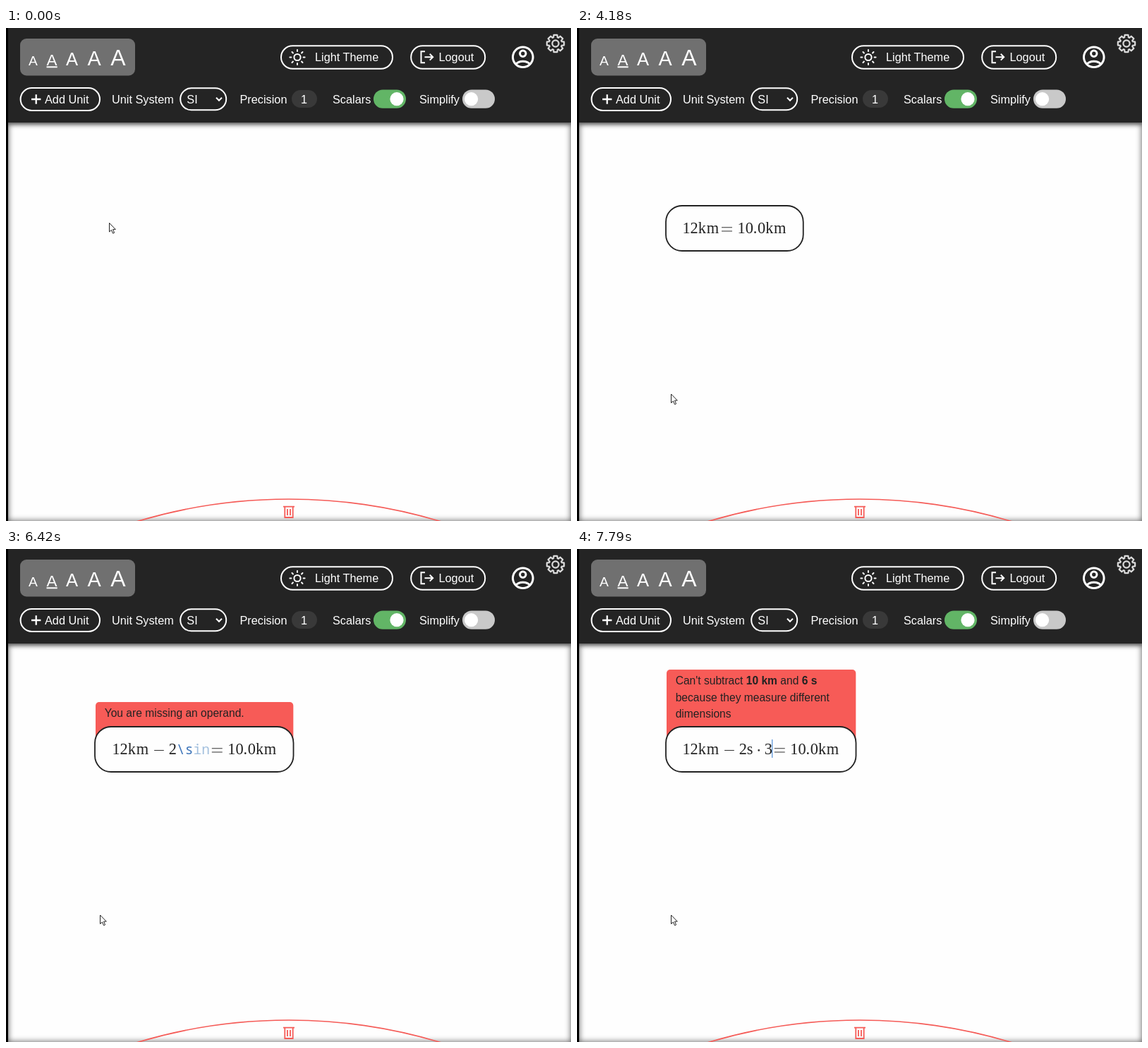
These frames come from a looping animation (801 by 699 pixels, 8 s). An HTML page:

```html
<!DOCTYPE html>
<html lang="en">
<head>
<meta charset="utf-8">
<title>Unit calculator</title>
<style>
  html, body { margin: 0; width: 100%; height: 100%; overflow: hidden; background: #000; }
  .board, .bar, svg { position: absolute; }
  .board { left: 3px; top: 134px; width: 798px; height: 565px; background: #fefefe; box-shadow: inset 0 0 8px #555; }
  .bar { left: 3px; top: 0; width: 798px; height: 134px; background: #242424; box-shadow: 0 2px 7px rgba(0, 0, 0, .55); }
  svg { left: 0; top: 0; width: 801px; height: 699px; display: block; }
  text { white-space: pre; font-family: "Liberation Sans", Arial, sans-serif; }
  .ui text { fill: #fff; font-size: 16.3px; }
  .line { fill: none; stroke: #fff; stroke-width: 2; }
  .red { fill: none; stroke: #f55b57; }
  .math { font: 22.4px "Liberation Serif", "Times New Roman", serif; fill: #222; }
  .code { font: 19.6px "Noto Sans Mono", "DejaVu Sans Mono", monospace; fill: #3f76ba; }
  .hint { fill: #a3c0de; }
  .note text { font-size: 15.6px; fill: #222; }
  .bold { font-weight: bold; }
</style>
</head>
<body>
<div class="board"></div>
<div class="bar"></div>
<svg viewBox="0 0 801 699">
  <g class="ui">
    <rect x="20" y="15" width="163" height="52.5" rx="9" fill="#707070"/>
    <g id="sizes" text-anchor="middle"></g>
    <path d="M57.5 55.3H72.7" class="line" stroke-width="1.5"/>

    <rect x="390" y="25.3" width="158" height="32.4" rx="16.2" class="line"/>
    <circle cx="413" cy="41.5" r="4.6" class="line"/>
    <path id="rays" class="line" stroke-linecap="round"/>
    <text x="438" y="47">Light Theme</text>

    <rect x="574.2" y="25.3" width="105" height="32.4" rx="16.2" class="line"/>
    <path d="M594 33.2H588.5V49.3H594M593.5 41.2H605M600.8 36.8L605.2 41.2L600.8 45.6" class="line"/>
    <text x="613.5" y="47">Logout</text>

    <g class="line" stroke-width="3" style="stroke-width:3">
      <circle cx="732.8" cy="41.3" r="14.3"/>
      <circle cx="732.8" cy="36.2" r="4.2"/>
      <path d="M722.8 51.3C727 45.8 738.6 45.8 742.8 51.3"/>
    </g>
    <g class="line" style="stroke:#dcdcdc;stroke-width:2.2" stroke-linejoin="round">
      <path id="gear"/>
      <circle cx="779" cy="22" r="4.6"/>
    </g>

    <rect x="20.6" y="85" width="112.4" height="32" rx="16" class="line"/>
    <path d="M36 101H49.4M42.7 94.3V107.7" class="line" style="stroke-width:2.3"/>
    <text x="55" y="106.5">Add Unit</text>
    <text x="150" y="106.5">Unit System</text>
    <rect x="247.2" y="85.3" width="65" height="31" rx="15.5" class="line"/>
    <text x="256.3" y="106.5">SI</text>
    <path d="M298 98.8L302 102.8L306 98.8" class="line"/>
    <text x="331.5" y="106.5">Precision</text>
    <rect x="405" y="88" width="36" height="25" rx="12.5" fill="#393939"/>
    <text x="422.5" y="106.5" text-anchor="middle">1</text>
    <text x="463" y="106.5">Scalars</text>
    <rect x="521" y="87.5" width="46" height="26.3" rx="13.1" fill="#62b566"/>
    <circle cx="554" cy="100.7" r="9.6" fill="#fff"/>
    <text x="586" y="106.5">Simplify</text>
    <rect x="647" y="87.5" width="46" height="26.3" rx="13.1" fill="#c9c9c9"/>
    <circle cx="659.6" cy="100.7" r="9.6" fill="#fff"/>
  </g>

  <circle cx="401" cy="1415" r="747" class="red" stroke-width="1.6"/>
  <path d="M393 678.7H409M395.3 678.7V694H406.7V678.7M399 682V691M403 682V691" class="red" stroke-width="1.8"/>

  <g class="note" id="note">
    <rect id="panel" x="127" rx="5" fill="#f75b57"/>
    <g id="message"></g>
  </g>
  <g id="cell">
    <rect id="box" x="126" y="252" height="64" rx="23" fill="#fefefe" stroke="#222" stroke-width="1.8"/>
    <path id="signs" fill="#333"/>
    <text id="math" class="math" y="291"></text>
    <text id="code" class="code" y="291"></text>
    <text id="hint" class="code hint" y="291"></text>
    <rect id="caret" y="270" width="1.4" height="26" fill="#6a9fdc"/>
  </g>
  <path id="mouse" d="M.5 .5V13L3.4 10.4L5.6 15.2L7.6 14.3L5.5 9.6H9.3Z" fill="#fff" stroke="#222" stroke-width="1"/>
</svg>
<script>
const LOOP = 8000;
const EM = 22.4, MONO = 11.8, BASE = 291;
const ADVANCE = { '.': .278, k: .528, m: .833, s: .394, '-': .778, '=': .778, '·': .278 };
const $ = id => document.getElementById(id);
const set = (el, attrs) => { for (const k in attrs) el.setAttribute(k, attrs[k]); };

const MISSING = { top: 217, lines: ['You are missing an operand.'] };
const mismatch = amount => ({
  top: 173,
  lines: [`Can't subtract *10 km* and *${amount}*`, 'because they measure', 'different dimensions']
});
const MISMATCH_WIDE = {
  top: 171,
  lines: ["Can't subtract *10 km* and *6 s*", 'because they measure different', 'dimensions']
};

// Each step overrides the previous one.
const steps = [
  { t: 0, shown: false, expr: '', code: '', hint: '', result: '', caret: false, error: null, alpha: 1 },
  { t: 130, shown: true, caret: true },
  { t: 670, caret: false },
  { t: 1090, caret: true },
  { t: 1660, expr: '1', result: '1.0' },
  { t: 1780, expr: '12', result: '10.0' },
  { t: 2200, code: '\\', caret: false },
  { t: 2760, code: '\\k', hint: 'er' },
  { t: 2890, code: '\\km', hint: '' },
  { t: 3600, expr: '12km', code: '', result: '10.0km', caret: true },
  { t: 4180, caret: false },
  { t: 4480, expr: '12km-', caret: true },
  { t: 5020, caret: false },
  { t: 5300, expr: '12km-2', caret: true },
  { t: 5440, code: '\\', caret: false },
  { t: 5860, code: '\\s', hint: 'in' },
  { t: 6000, error: MISSING, alpha: .3 },
  { t: 6130, alpha: .65 },
  { t: 6290, alpha: .95 },
  { t: 6420, alpha: 1 },
  { t: 6540, expr: '12km-2s', code: '', hint: '', caret: true, error: mismatch('2 s') },
  { t: 6690, error: mismatch('2') },
  { t: 7120, caret: false },
  { t: 7530, expr: '12km-2s·', caret: true, error: MISSING },
  { t: 7790, expr: '12km-2s·3', error: MISMATCH_WIDE }
];
for (let i = 1; i < steps.length; i++) steps[i] = { ...steps[i - 1], ...steps[i] };

const mousePath = [[0, 146, 276], [820, 119, 420], [940, 133, 509], [1090, 133, 518.5]];

const bar = (x, from, width, height) =>
  `M${x + from * EM} ${BASE - height * EM - .5}h${width * EM}v1h${-width * EM}z`;

function layout(s) {
  const glyphs = [], xs = [];
  let signs = '';
  let x = s.code.length > 1 ? 150.4 : 149.4;

  const put = c => {
    if (c === '-') signs += bar(x, .083, .611, .25);
    else if (c === '=') signs += bar(x, .056, .667, .133) + bar(x, .056, .667, .367);
    else if (c === '·') signs += `M${x + 1.7} ${BASE - 5.6}a1.4 1.4 0 1 1 2.8 0a1.4 1.4 0 1 1 -2.8 0z`;
    else { glyphs.push(c); xs.push(x); }
    x += (ADVANCE[c] || .5) * EM;
  };
  const mono = (el, str) => {
    el.textContent = str;
    set(el, { x: [...str].map((_, i) => x + i * MONO).join(' ') });
    x += str.length * MONO;
  };

  [...s.expr].forEach((c, i) => {
    const operator = '-·'.includes(c);
    if (operator) x += .222 * EM;
    put(c);
    if (operator && i < s.expr.length - 1) x += .222 * EM;
  });
  mono($('code'), s.code);
  mono($('hint'), s.hint);
  set($('caret'), { x: Math.floor(x - .3), visibility: s.caret ? 'inherit' : 'hidden' });
  x += 1.5;
  if (s.result) {
    put('=');
    x += .278 * EM;
    [...s.result].forEach(put);
  }
  $('math').textContent = glyphs.join('');
  set($('math'), { x: xs.join(' ') });
  set($('signs'), { d: signs });
  return x + 24;
}

function showError(s, right) {
  set($('note'), { visibility: s.error ? 'visible' : 'hidden', opacity: s.alpha });
  if (!s.error) return;
  const { top, lines } = s.error;
  set($('panel'), { y: top, width: right - 128.2, height: 275 - top });
  $('message').innerHTML = lines.map((line, i) => {
    const parts = line.split('*').map((p, j) => j % 2 ? `<tspan class="bold">${p}</tspan>` : p);
    return `<text x="139.7" y="${top + 21 + i * 23.6}">${parts.join('')}</text>`;
  }).join('');
}

function drawIcons() {
  const polar = (cx, cy, r, a) => `${(cx + r * Math.cos(a)).toFixed(2)} ${(cy + r * Math.sin(a)).toFixed(2)}`;
  let rays = '', gear = '';
  for (let i = 0; i < 8; i++) {
    const a = i * Math.PI / 4;
    rays += `M${polar(413, 41.5, 8.6, a)}L${polar(413, 41.5, 10.6, a)}`;
    [[9.2, -.32], [12.4, -.2], [12.4, .2], [9.2, .32]].forEach(([r, d]) => {
      gear += (gear ? 'L' : 'M') + polar(779, 22, r, a + d);
    });
  }
  set($('rays'), { d: rays });
  set($('gear'), { d: gear + 'Z' });
  const centers = [38.5, 65, 93.5, 125, 159];
  $('sizes').innerHTML = centers.map((x, i) =>
    `<text x="${x}" y="52.8" style="font-size:${19.2 + i * 3.2}px">A</text>`).join('');
}

let current = null;
function render(t) {
  const s = steps.findLast(step => step.t <= t);
  if (s !== current) {
    current = s;
    const right = layout(s);
    set($('box'), { width: right - 127 });
    set($('cell'), { visibility: s.shown ? 'visible' : 'hidden' });
    showError(s, right);
  }
  const [, mx, my] = mousePath.findLast(p => p[0] <= t);
  set($('mouse'), { transform: `translate(${mx} ${my})` });
}

drawIcons();
const start = performance.now();
function tick() {
  render((performance.now() - start) % LOOP);
  requestAnimationFrame(tick);
}
tick();
</script>
</body>
</html>
```
